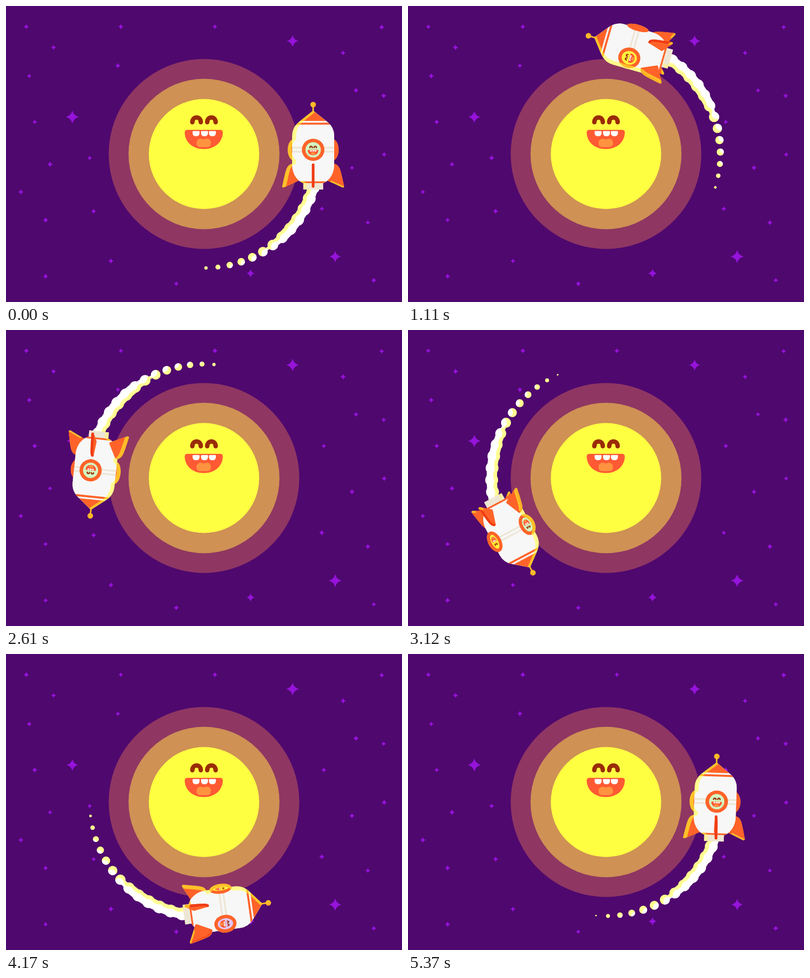
Animation of 800x600 px, one loop 5.4 s. Source, as an HTML page with a canvas:

```html
<!DOCTYPE html>
<html>
<head>
<meta charset="utf-8">
<style>
html, body { margin: 0; width: 100%; height: 100%; overflow: hidden; background: #4f086e; }
canvas { display: block; }
</style>
</head>
<body>
<canvas id="stage" width="800" height="600"></canvas>
<script>
const LOOP = 5400, STEP = 30, RAD = Math.PI / 180, SHADE = 8;
const newLayer = () => Object.assign(document.createElement('canvas'), { width: 800, height: 600 }).getContext('2d');
const stage = document.getElementById('stage').getContext('2d');
const litLayer = newLayer(), plainLayer = newLayer(), smokeLayer = newLayer();

const PLAIN = { body: '#f7f7f7', cream: '#eee6d5', orange: '#ff6329', red: '#f03c14', ball: '#ffa726' };
const LIT = { body: '#fffb8c', cream: '#f8eda0', orange: '#ffc02a', red: '#ffae22', ball: '#ffbb28' };
const GLASS = ['#d3f7c1', '#fff23c', '#e2c6f6'];
const BROWN = '#9a2c06';

// x, y and optional radius
const STARS = [
  [41, 42], [232, 42], [422, 42], [759, 43], [96, 84], [681, 95], [226, 121], [47, 142],
  [707, 171], [763, 182], [58, 235], [642, 235], [169, 308], [764, 301], [89, 321],
  [699, 328], [30, 377], [177, 416], [638, 411], [80, 434], [731, 439], [212, 517],
  [80, 548], [344, 563], [743, 556], [494, 542, 9], [579, 71, 13], [134, 225, 13.3], [665, 508, 13.3]
];

const BODY = new Path2D('M0 212L30 236Q42.5 247 42.5 263V322C42.5 342 30 356 20 359H-20C-30 356 -42.5 342 -42.5 322V263Q-42.5 247 -30 236Z');
const MOUTH = new Path2D('M366 251H433Q438 251 438 257C437 277 421 290 399.5 290C378 290 362 277 361 257Q361 251 366 251Z');
const TONGUE = new Path2D('M393 269Q397 269 399.5 271Q402 269 406 269A8 8 0 0 1 414 277V279A7 7 0 0 1 407 286H392A7 7 0 0 1 385 279V277A8 8 0 0 1 393 269Z');
const SMILING_EYES = new Path2D('M376.5 235.5C376.5 222.8 393.5 222.8 393.5 235.5M406.5 235.5C406.5 222.8 423.5 222.8 423.5 235.5');

function oval(c, x, y, rx, ry, color) {
  c.fillStyle = color;
  c.beginPath();
  c.ellipse(x, y, rx, ry, 0, 0, 7);
  c.fill();
}
const disc = (c, x, y, r, color) => oval(c, x, y, r, r, color);

function drawStar(x, y, r) {
  const k = r * 0.2;
  stage.beginPath();
  stage.moveTo(x, y - r);
  stage.quadraticCurveTo(x + k, y - k, x + r, y);
  stage.quadraticCurveTo(x + k, y + k, x, y + r);
  stage.quadraticCurveTo(x - k, y + k, x - r, y);
  stage.quadraticCurveTo(x - k, y - k, x, y - r);
  stage.fill();
}

function drawFace(c, t) {
  if (t >= 1380 && t < 2340) {
    const look = (t / 15 - 20) * RAD;
    for (const x of [386, 414]) disc(c, x, 234, 14.5, '#fff');
    for (const x of [386, 413.5]) {
      const px = x + 9 * Math.cos(look), py = 234 - 9 * Math.sin(look);
      disc(c, px, py, 7.5, BROWN);
      disc(c, px - 4, py - 4, 3.3, '#fff');
    }
  } else {
    c.strokeStyle = BROWN;
    c.lineWidth = 9;
    c.lineCap = 'round';
    c.stroke(SMILING_EYES);
  }
  c.fillStyle = '#ff5a33';
  c.fill(MOUTH);
  c.fillStyle = '#ff9340';
  c.fill(TONGUE);
  c.fillStyle = '#fff';
  for (const x of [377, 394, 410]) {
    c.beginPath();
    c.roundRect(x, 253.5, 14, 10.5, [1, 1, 6, 6]);
    c.fill();
  }
}

function drawFin(c, angle, pal) {
  const s = Math.sin(angle), front = Math.cos(angle);
  const edge = () => {
    c.beginPath();
    c.moveTo(41 * s, 322);
    c.bezierCurveTo(52 * s, 323, 53 * s, 334, 60 * s, 365.5);
  };
  c.lineJoin = c.lineCap = 'round';
  c.fillStyle = c.strokeStyle = pal.orange;
  c.lineWidth = 5;
  edge();
  c.lineTo(26 * s, 350);
  c.closePath();
  c.fill();
  c.stroke();
  if (front > 0.15) {
    c.strokeStyle = pal.red;
    c.lineWidth = 5.5 * front;
    edge();
    c.stroke();
  }
}

function drawPorthole(c, angle, glass, pal, t) {
  const turn = Math.cos(angle), x = 43 * Math.sin(angle);
  oval(c, x, 291.5, 17 * Math.abs(turn) + 5.8, 22.5, pal.orange);
  if (turn < 0.05) return;
  c.save();
  c.translate(x, 291.5);
  c.scale(turn, 1);
  disc(c, 0, 0, 15.5, glass);
  c.scale(0.28, 0.28);
  c.translate(-400, -251);
  drawFace(c, t);
  c.restore();
}

function drawRocket(c, t, pal) {
  const spin = t / 7.5;
  const fins = [0, 90, 180, 270].map(a => (a - spin) * RAD);
  const ports = GLASS.map((glass, i) => [(120 * i - spin) * RAD, glass]);
  const isFront = a => Math.cos(a) > -0.1;
  const finFront = a => Math.cos(a) > 0.15;
  const bar = (x, y, w, h, color) => { c.fillStyle = color; c.fillRect(x, y, w, h); };

  c.setTransform(1, 0, 0, 1, 0, 0);
  c.globalCompositeOperation = 'source-over';
  c.clearRect(0, 0, 800, 600);
  c.translate(400, 300);
  c.rotate(-t / 15 * RAD);
  c.translate(220.5, -300);

  for (const a of fins) if (!finFront(a)) drawFin(c, a, pal);
  for (const [a, glass] of ports) if (!isFront(a)) drawPorthole(c, a, glass, pal, t);
  bar(-1.5, 203, 3, 14, pal.ball);
  disc(c, 0, 199.8, 5.6, pal.ball);
  bar(-20, 357, 40, 15, pal.cream);

  c.save();
  c.clip(BODY);
  bar(-50, 205, 100, 160, pal.body);
  bar(-50, 205, 100, 28, pal.orange);
  bar(-50, 236.5, 100, 4, pal.orange);
  bar(-50, 355.5, 100, 4, pal.orange);
  bar(-50, 285.5, 100, 3.5, pal.cream);
  bar(-50, 293.5, 100, 3.5, pal.cream);
  c.restore();

  for (const [a, glass] of ports) if (isFront(a)) drawPorthole(c, a, glass, pal, t);
  for (const a of fins) if (finFront(a)) drawFin(c, a, pal);
}

// The sunlit side is whatever a copy shifted away from the sun leaves uncovered.
function shadeRocket(t) {
  drawRocket(litLayer, t, LIT);
  drawRocket(plainLayer, t, PLAIN);
  const a = t / 15 * RAD;
  plainLayer.setTransform(1, 0, 0, 1, 0, 0);
  plainLayer.globalCompositeOperation = 'destination-in';
  plainLayer.drawImage(litLayer.canvas, SHADE * Math.cos(a), -SHADE * Math.sin(a));
  stage.drawImage(litLayer.canvas, 0, 0);
  stage.drawImage(plainLayer.canvas, 0, 0);
}

function drawSmoke(t) {
  const c = smokeLayer, head = -t / 15;
  const puffs = [];
  for (let k = Math.ceil((head + 13) / 6); ; k++) {
    const angle = 6 * k - 1, age = angle - head;
    if (age >= 95) break;
    const r = Math.min(13, 15.5 * Math.pow(Math.min(1, (95 - age) / 77), 0.6));
    const dir = (angle + head) / 2 * RAD;
    puffs.push({
      x: 400 + 231 * Math.cos(angle * RAD), y: 300 + 231 * Math.sin(angle * RAD), r,
      dx: SHADE * Math.cos(dir), dy: SHADE * Math.sin(dir)
    });
  }
  const pass = (color, shift) => {
    c.strokeStyle = color;
    c.lineCap = 'butt';
    puffs.forEach((p, i) => {
      const x = p.x + p.dx * shift, y = p.y + p.dy * shift, q = puffs[i + 1];
      disc(c, x, y, p.r, color);
      if (!q || q.r < 9.7) return;
      c.lineWidth = Math.min(21, 5 + (q.r - 9.7) * 9);
      c.beginPath();
      c.moveTo(x, y);
      c.lineTo(q.x + q.dx * shift, q.y + q.dy * shift);
      c.stroke();
    });
  };
  c.globalCompositeOperation = 'source-over';
  c.clearRect(0, 0, 800, 600);
  pass('#fffd92', 0);
  c.globalCompositeOperation = 'source-atop';
  pass('#fff', 1);
  stage.drawImage(c.canvas, 0, 0);
}

function draw(t) {
  stage.fillStyle = '#4f086e';
  stage.fillRect(0, 0, 800, 600);
  stage.fillStyle = '#9513da';
  STARS.forEach(([x, y, r = 6], i) => {
    const twinkle = 0.93 + 0.07 * Math.sin(2 * Math.PI * 3 * t / LOOP + i * 2.4);
    drawStar(x, y, r * twinkle);
  });
  disc(stage, 400, 300, 192.5, '#8f3663');
  disc(stage, 400, 300, 152.5, '#cf9154');
  disc(stage, 400, 300, 111.5, '#ffff42');
  drawFace(stage, t);
  drawSmoke(t);
  shadeRocket(t);
}

const start = performance.now();
function tick() {
  const t = (performance.now() - start) % LOOP;
  draw(Math.floor(t / STEP) * STEP);
  requestAnimationFrame(tick);
}
tick();
</script>
</body>
</html>
```
